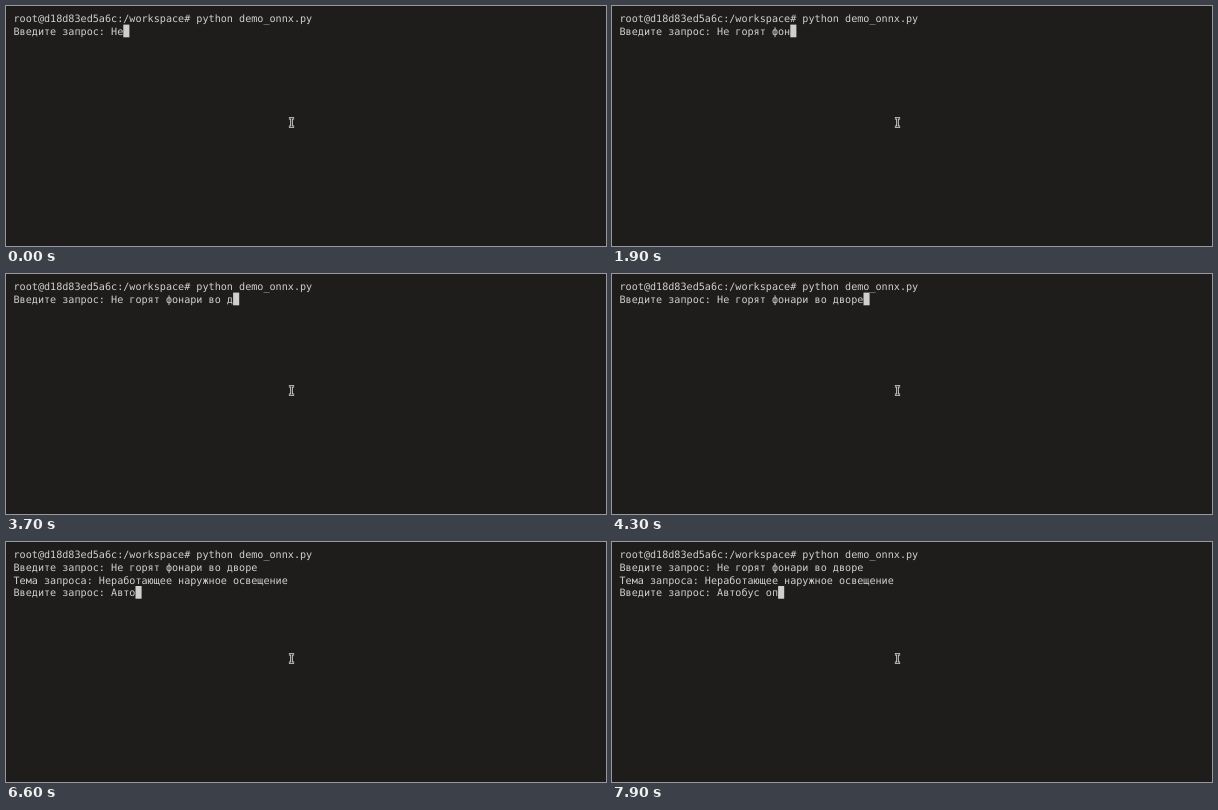
An HTML page for the animation above (8 s loop, 600x240 px).

```html
<!DOCTYPE html>
<html lang="ru">
<head>
<meta charset="utf-8">
<title>Terminal</title>
<style>
  html, body { margin: 0; width: 100%; height: 100%; overflow: hidden; background: #1e1d1b; }
  svg { display: block; width: 600px; height: 240px; }
  text {
    font: 10.13px "DejaVu Sans Mono", monospace;
    fill: #d0cfcc;
    white-space: pre;
    text-rendering: geometricPrecision;
  }
</style>
</head>
<body>
<svg id="stage" viewBox="0 0 600 240">
  <rect width="600" height="240" fill="#1e1d1b"/>
  <g id="lines"></g>
  <rect id="cursor" width="6.1" height="12.7" fill="#d0cfcc"/>
  <g fill="none">
    <path d="M282.9 112.2H288.1M285.5 112.2V120.8M282.9 120.8H288.1" stroke="#d8d8d6" stroke-width="2.6"/>
    <path d="M283.3 112.2H287.7M285.5 112.2V120.8M283.3 120.8H287.7" stroke="#2a2a29" stroke-width="0.9"/>
  </g>
</svg>
<script>
const LOOP = 8000, LEFT = 7.5, TOP = 5.9, CHAR = 6.1, LINE = 12.7, BASE = 10.4;
const COMMAND = "root@d18d83ed5a6c:/workspace# python demo_onnx.py";
const PROMPT = "Введите запрос: ";
const ANSWER = "Тема запроса: Неработающее наружное освещение";
const FIRST = "Не горят фонари во дворе";
const SECOND = "Автобус оп";
const ENTER = 4400, REPLY = 5100;

// One key time per character; equal times are keys that land together.
const firstKeys = [0, 0, 400, 600, 700, 900, 1100, 1200, 1300, 1700, 1700, 1900,
  2000, 2200, 2400, 2500, 3200, 3300, 3400, 3700, 3900, 4000, 4200, 4300];
const secondKeys = [6100, 6400, 6500, 6600, 6900, 7000, 7200, 7300, 7700, 7900];

const lines = document.getElementById("lines");
const cursor = document.getElementById("cursor");
const rows = [0, 1, 2, 3].map(i => {
  const row = document.createElementNS("http://www.w3.org/2000/svg", "text");
  row.setAttribute("x", LEFT);
  row.setAttribute("y", TOP + BASE + i * LINE);
  return lines.appendChild(row);
});

const typed = (text, keys, t) => text.slice(0, keys.filter(k => k <= t).length);

function screenAt(t) {
  const screen = [COMMAND, PROMPT + typed(FIRST, firstKeys, t)];
  if (t >= REPLY) screen.push(ANSWER, PROMPT + typed(SECOND, secondKeys, t));
  else if (t >= ENTER) screen.push("");
  return screen;
}

function draw(t) {
  const screen = screenAt(t);
  rows.forEach((row, i) => {
    const text = screen[i] || "";
    if (row.textContent !== text) row.textContent = text;
  });
  const last = screen.length - 1;
  cursor.setAttribute("x", LEFT + screen[last].length * CHAR);
  cursor.setAttribute("y", TOP + last * LINE);
}

const start = performance.now();
function frame() {
  draw((performance.now() - start) % LOOP);
  requestAnimationFrame(frame);
}
draw(0);
requestAnimationFrame(frame);
</script>
</body>
</html>
```
